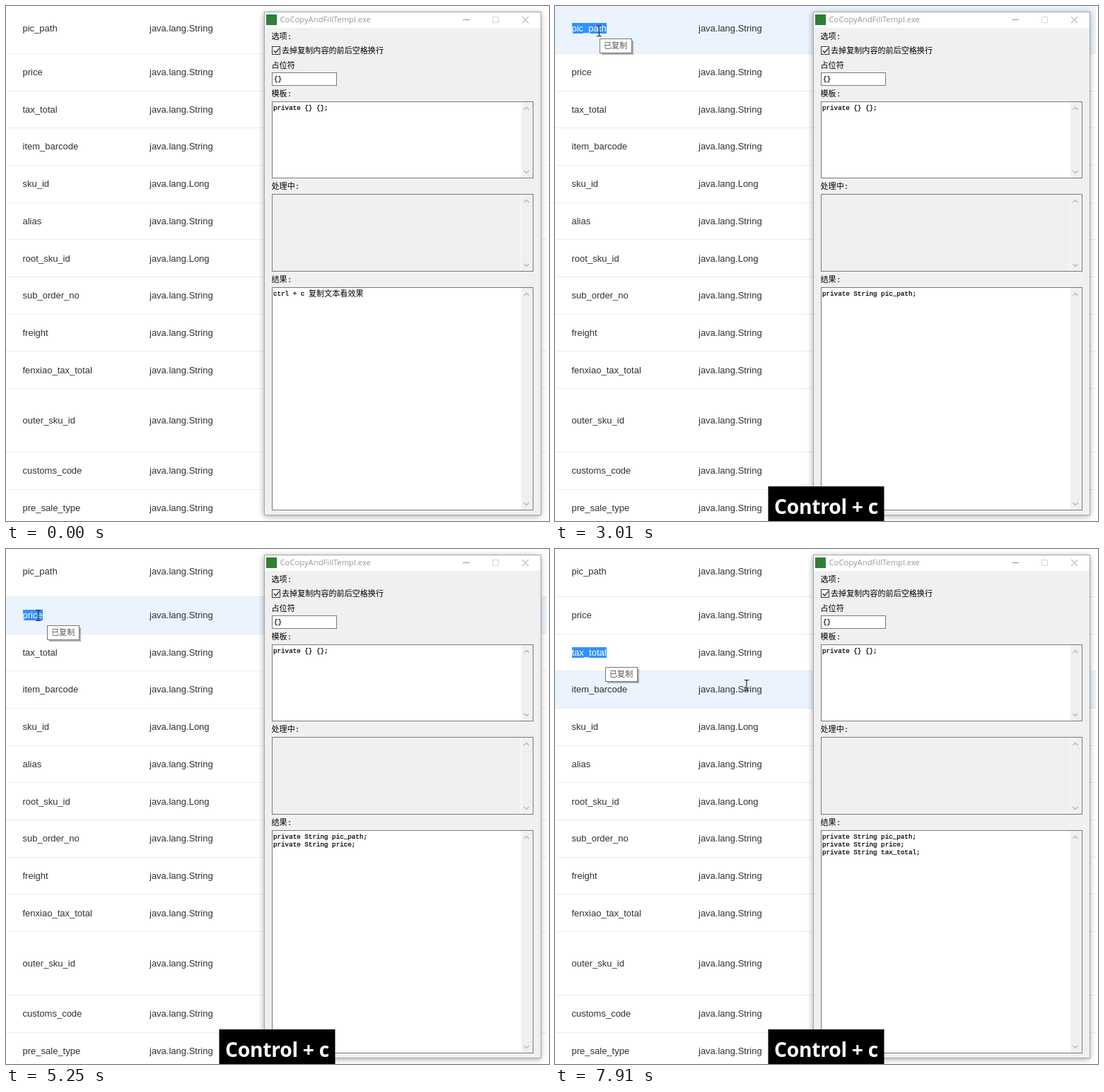
Write an HTML page that moves like this. It is 768x729 px and loops after 8 s.

```html
<!DOCTYPE html>
<html lang="zh">
<head>
<meta charset="utf-8">
<title>Copy and fill a template</title>
<style>
  html, body { margin: 0; width: 100%; height: 100%; overflow: hidden; background: #fff; }
  svg { display: block; width: 768px; height: 729px; }
  text { white-space: pre; }
  .cell { font: 13px "Liberation Sans", Arial, sans-serif; fill: #303133; }
  .picked { fill: #fff; }
  .ui { font: 11.08px "Liberation Mono", "Noto Sans CJK SC", "Noto Sans CJK", "Noto Sans CJK JP", sans-serif; fill: #000; }
  .mono { font: 9.24px "Liberation Mono", "Noto Sans Mono", monospace; fill: #000; stroke: #000; stroke-width: .25px; }
  .title { font: 11.25px "Open Sans", "Noto Sans", sans-serif; fill: #999; }
  .key { font: bold 28.3px "Open Sans", "Noto Sans", sans-serif; letter-spacing: -.3px; fill: #fff; }
  .tip { fill: #575757; }
  .win { filter: drop-shadow(0 2px 4px rgba(0, 0, 0, .38)); }
</style>
</head>
<body>
<svg id="stage" viewBox="0 0 768 729"></svg>
<script>
const LOOP = 8000;
const stage = document.getElementById('stage');

function add(tag, attrs, parent = stage, text) {
  const node = document.createElementNS('http://www.w3.org/2000/svg', tag);
  for (const key in attrs) node.setAttribute(key, attrs[key]);
  if (text !== undefined) node.textContent = text;
  return parent.appendChild(node);
}
const rect = (x, y, width, height, fill, parent, more) =>
  add('rect', { x, y, width, height, fill, ...more }, parent);
const label = (cls, x, y, text, parent) => add('text', { class: cls, x, y }, parent, text);
const line = (d, stroke, parent, width = 1) =>
  add('path', { d, stroke, fill: 'none', 'stroke-width': width }, parent);
const show = (node, on) => node.setAttribute('visibility', on ? 'visible' : 'hidden');
const move = (node, x, y) => node.setAttribute('transform', `translate(${x} ${y})`);

// Table: name, type, text baseline, bottom edge
const rows = [
  ['pic_path', 'String', 36, 67], ['price', 'String', 98, 120],
  ['tax_total', 'String', 151, 172], ['item_barcode', 'String', 203, 225],
  ['sku_id', 'Long', 256, 278], ['alias', 'String', 309, 330],
  ['root_sku_id', 'Long', 362, 383], ['sub_order_no', 'String', 414, 436],
  ['freight', 'String', 467, 488], ['fenxiao_tax_total', 'String', 520, 541],
  ['outer_sku_id', 'String', 591, 631], ['customs_code', 'String', 662, 684],
  ['pre_sale_type', 'String', 715, 737]
];
const NAME_X = 23.5, TYPE_X = 203, CLASS_X = 258.6;
const tops = rows.map((r, i) => i ? rows[i - 1][3] : 0);
const hovers = rows.map((r, i) => rect(0, tops[i], 765, r[3] - tops[i], '#ebf3fe'));
for (const [name, type, y, bottom] of rows) {
  rect(0, bottom, 765, 1, '#ebecef');
  label('cell', NAME_X, y, name);
  label('cell', TYPE_X, y, 'java.lang.' + type);
}

// Selections: from, to, row, column
const picks = [
  [1150, 2470, 0, 'type'], [2620, 3620, 0, 'name'],
  [3770, 4690, 1, 'type'], [4930, 6120, 1, 'name'],
  [6350, 7070, 2, 'type'], [7220, LOOP, 2, 'name']
].map(([from, to, row, column]) => {
  const g = add('g');
  const y = rows[row][2], isName = column === 'name';
  const x = isName ? NAME_X : CLASS_X;
  const box = rect(isName ? 24 : 258, y - (isName ? 12 : 14), 34, isName ? 15 : 18, '#3390ff', g);
  const text = label('cell picked', x, y, rows[row][isName ? 0 : 1], g);
  box.setAttribute('width', Math.round(text.getComputedTextLength()));
  return { g, from, to };
});

// Window
rect(365, 8, 391, 712, '#f0f0f0', stage, { class: 'win' });
rect(365.5, 8.5, 391, 712, '#f0f0f0', stage, { stroke: '#a6a6a6' });
rect(366, 9, 390, 22, '#fff');
rect(368, 12, 15, 15, '#2f7f38');
label('title', 387.5, 23, 'CoCopyAndFillTempl.exe');
line('M646 19.5h10', '#999');
line('M688.5 15.5h8v8h-8z', '#d4d4d4');
line('M730 15l9 9m0-9l-9 9', '#999');

label('ui', 375.5, 47, '选项:');
rect(376.5, 57.5, 11, 11, '#fff', stage, { stroke: '#333' });
line('M378.5 63l3 3l5-6', '#222', stage, 1.2);
label('ui', 390, 67, '去掉复制内容的前后空格换行');
label('ui', 375.5, 88, '占位符');
rect(376.5, 94.5, 91, 18, '#fff', stage, { stroke: '#7a7a7a' });
label('mono', 379, 106, '{}');

function area(title, y, height, fill) {
  label('ui', 375.5, y - 7, title);
  rect(376.5, y + .5, 369, height, fill, stage, { stroke: '#7a7a7a' });
  rect(729, y + 1, 16, height - 1, '#f0f0f0');
  if (fill !== '#fff') rect(728, y + 1, 1, height - 1, '#fafafa');
  line(`M732.5 ${y + 12}l3.5-3.5l3.5 3.5M732.5 ${y + height - 10}l3.5 3.5l3.5-3.5`, '#b8b8b8', stage, 1.4);
}
area('模板:', 135, 108, '#fff');
area('处理中:', 266, 109, '#f0f0f0');
area('结果:', 398, 315, '#fff');
label('mono', 378, 147, 'private {} {};');
const working = label('mono', 378, 278, 'private String {};');
const hint = add('g');
label('mono', 378, 410, 'ctrl + c', hint);
label('ui', 428, 411, '复制文本看效果', hint);
const RESULT_TIMES = [2920, 5250, 7370];
const results = RESULT_TIMES.map((t, i) =>
  label('mono', 378, 410 + 11 * i, `private String ${rows[i][0]};`));

// Copy notice
const tip = add('g');
rect(3, 3, 45, 20, '#777', tip, { opacity: .55 });
rect(.5, .5, 45, 20, '#fff', tip, { stroke: '#767676' });
label('ui tip', 6, 14, '已复制', tip);

// Key caption
const keys = add('g');
rect(301.5, 680, 164, 49, '#000', keys);
label('key', 310, 719, 'Control + c', keys);

// Pointer; the click mark multiplies so the text below stays readable
const pointer = add('g');
const glow = add('circle', { r: 11, cx: -1, fill: '#f5e94a' });
glow.style.mixBlendMode = 'multiply';
stage.insertBefore(glow, pointer);
line('M-3.5 -7.5h2.5l1 1l1-1h2.5M0 -6.5V6.5M-3.5 7.5h2.5l1-1l1 1h2.5', '#222', pointer, 1.1);

// Pointer path: time, x, y
const path = [
  [130, 450, 706], [750, 267, 32], [1930, 267, 32], [2400, 51, 32],
  [2920, 51, 32], [3560, 284, 97], [4000, 284, 97], [4540, 43.5, 92],
  [4690, 46, 94], [5250, 46, 94], [5970, 258, 145], [6080, 271, 142],
  [6650, 271, 142], [7000, 59, 153], [7370, 59, 153], [7900, 271, 193]
];
const clicks = [
  [920, 1070], [1150, 1320], [2470, 2540], [2620, 2770],
  [3620, 3700], [3770, 3850], [4690, 4860], [4930, 5100],
  [6120, 6270], [6350, 6500], [7070, 7140], [7220, 7290]
];
const copies = [1930, 2920, 4000, 5250, 6650, 7370];
const captions = [[1930, 3770], [4000, 4860], [5250, 6040], [6650, LOOP]];
const fills = [[1930, 2920], [4000, 5250], [6650, 7370]];
const TIP_TIME = 690, FADE = 200;
const within = (list, t) => list.some(([from, to]) => t >= from && t < to);

function pointerAt(t) {
  const next = path.findIndex(p => p[0] > t);
  if (next === 0) return null;
  if (next < 0) return path[path.length - 1].slice(1);
  const [t0, x0, y0] = path[next - 1], [t1, x1, y1] = path[next];
  const u = (1 - Math.cos(Math.PI * (t - t0) / (t1 - t0))) / 2;
  return [x0 + (x1 - x0) * u, y0 + (y1 - y0) * u];
}

// Row tint fades with the share of recent time spent over the row
function hoverAt(i, t) {
  const n = 10;
  let hits = 0;
  for (let k = 0; k < n; k++) {
    const p = pointerAt(t - FADE * k / n);
    if (p && p[0] < 365 && p[1] >= tops[i] && p[1] < rows[i][3]) hits++;
  }
  return hits / n;
}

function draw(t) {
  const at = pointerAt(t);
  show(pointer, at);
  show(glow, at && within(clicks, t));
  if (at) for (const node of [pointer, glow]) move(node, at[0], at[1]);
  hovers.forEach((h, i) => h.setAttribute('opacity', hoverAt(i, t)));
  for (const p of picks) show(p.g, t >= p.from && t < p.to);

  const copied = copies.find(c => t >= c && t < c + TIP_TIME);
  show(tip, copied !== undefined);
  if (copied !== undefined) {
    const [x, y] = pointerAt(copied);
    move(tip, Math.round(x + 12), Math.round(y + 14));
  }
  show(keys, within(captions, t));
  show(working, within(fills, t));
  show(hint, t < RESULT_TIMES[0]);
  results.forEach((r, i) => show(r, t >= RESULT_TIMES[i]));
}

const start = performance.now();
function tick() {
  draw((performance.now() - start) % LOOP);
  requestAnimationFrame(tick);
}
tick();
</script>
</body>
</html>
```
